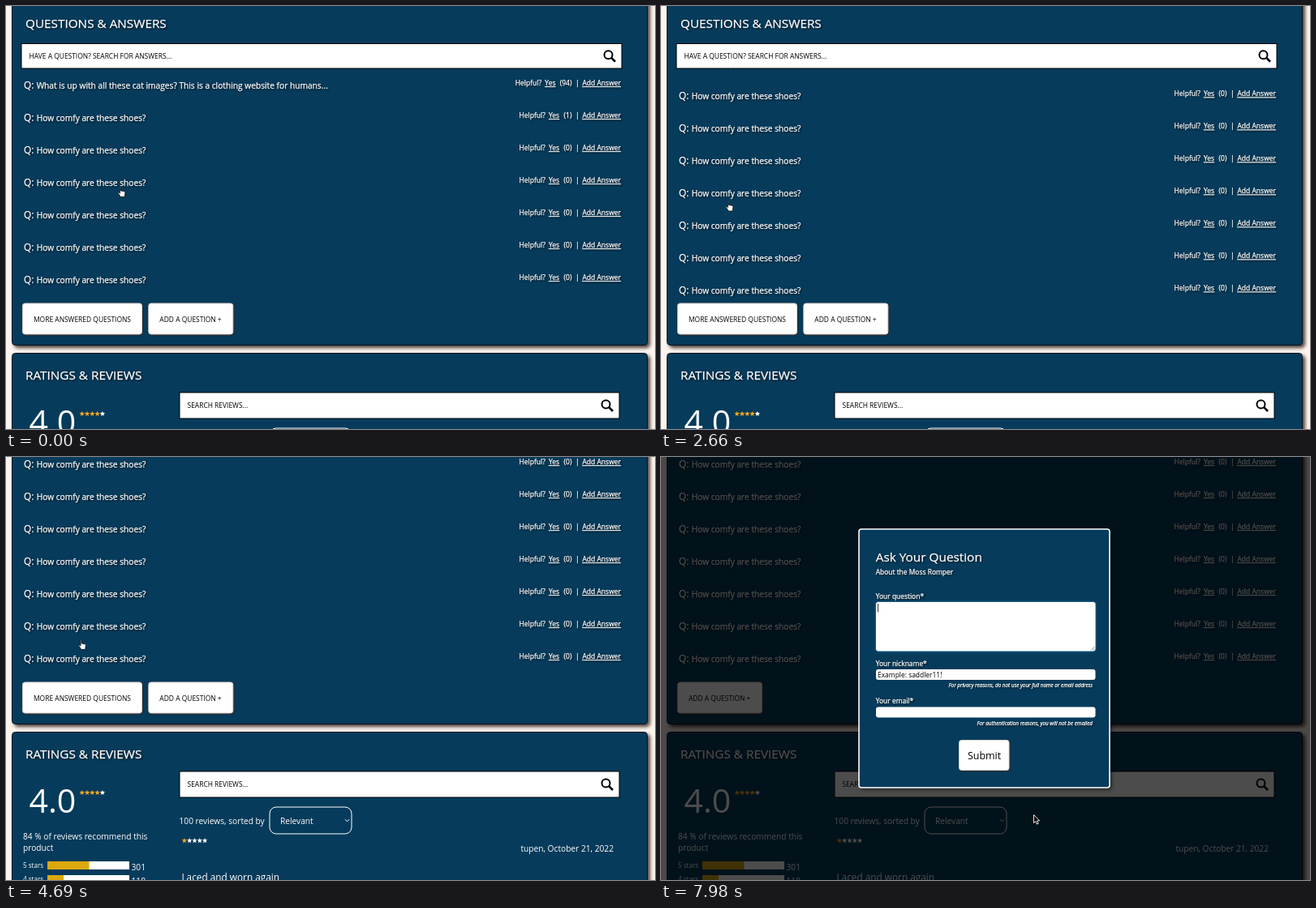
Write an HTML page that moves like this. It is 800 px wide and 522 px high and loops after 8 s.

```html
<!DOCTYPE html>
<html lang="en">
<head>
<meta charset="utf-8">
<title>Questions and answers</title>
<style>
  html, body { margin: 0; width: 100%; height: 100%; overflow: hidden; background: #fcf4ee; }
  svg { display: block; width: 800px; height: 522px; font-family: "Open Sans", "Noto Sans", sans-serif; }
  text { fill: #fff; white-space: pre; }
  .ink { fill: #000; }
  .lit { filter: drop-shadow(1px 1px 1px rgba(0, 0, 0, .75)); }
  .lit text { stroke: #fff; stroke-width: .25; }
  .panel { fill: #063b5b; stroke: #04121c; filter: drop-shadow(3px 3px 2px rgba(50, 32, 26, .85)); }
  .btn rect { fill: #fff; stroke: #d9d2cc; filter: drop-shadow(1px 1px 1px rgba(60, 40, 30, .8)); }
  .btn text { fill: #000; }
  .btn.on rect { fill: #1d272e; stroke: #78838a; filter: none; }
  .btn.on text { fill: #fff; }
  .field { fill: #fff; stroke: #000; }
  .hint { font-style: italic; text-anchor: end; }
  .focus { filter: drop-shadow(0 0 1px #4aa3e0); }
</style>
</head>
<body>
<svg id="stage" viewBox="0 0 800 522"></svg>
<script>
const LOOP = 8000, MORE_GONE = 5800, MODAL_AT = 6570, FOCUS_AT = 7430;

// [time, value...]
const listTrack = [[2240, 0], [2310, 1.3], [2450, 22], [2650, 66], [2850, 80], [4700, 80], [4900, 112], [5150, 152], [5350, 160]];
const pageTrack = [[2790, 0], [2940, 14.5], [3150, 68], [3250, 83], [3360, 89]];
const mouseTrack = [
  [0, 140.5, 224], [120, 140.5, 224], [600, 96, 386], [1720, 96, 388], [2150, 82.5, 241.5],
  [3290, 82.5, 241.5], [3430, 82.5, 288], [3600, 89.5, 294.5], [4200, 89.5, 294.5], [4520, 92, 226],
  [5250, 92, 226], [5470, 89.5, 294.5], [6620, 89.5, 294.5], [7200, 342, 204], [7480, 344, 206], [7930, 459.5, 441.5]
];

const smooth = u => u * u * (3 - 2 * u);
function at(track, t, ease = u => u) {
  const next = track.findIndex(k => k[0] > t);
  if (next < 0) return track[track.length - 1].slice(1);
  if (next === 0) return track[0].slice(1);
  const a = track[next - 1], b = track[next];
  const u = ease((t - a[0]) / (b[0] - a[0]));
  return a.slice(1).map((v, i) => v + (b[i + 1] - v) * u);
}

const text = (x, y, size, str, attrs = "") =>
  `<text x="${x}" y="${y}" font-size="${size}" ${attrs}>${str}</text>`;
const rect = (x, y, w, h, attrs = "") =>
  `<rect x="${x}" y="${y}" width="${w}" height="${h}" ${attrs}/>`;

function stars(x, y, gold) {
  let out = "";
  for (let i = 0; i < 5; i++) {
    const pts = Array.from({ length: 10 }, (_, k) => {
      const r = k % 2 ? 1.5 : 3.4, a = Math.PI * (k / 5 - .5);
      return (x + 3.2 + i * 6.3 + r * Math.cos(a)).toFixed(2) + "," + (y + r * Math.sin(a)).toFixed(2);
    });
    out += `<polygon points="${pts.join(" ")}" fill="${i < gold ? "#f3a61c" : "#fff"}"/>`;
  }
  return out;
}

const search = (x, y, w, h, label) =>
  rect(x, y, w, h, 'class="field"') +
  text(x + 9.5, y + h / 2 + 3.1, 8.45, label, 'class="ink"') +
  `<g transform="translate(${x + w - 15} ${y + h / 2})" fill="none" stroke="#000" stroke-width="2">
    <circle cx="-1.5" cy="-1.5" r="5"/><path d="M2.2 2.2L7 7" stroke-width="2.6"/></g>`;

function row(i) {
  const votes = [94, 1][i] ?? 0, dx = votes > 9 ? -4.7 : 0, y = 40 * i;
  const q = i ? "How comfy are these shoes?"
    : "What is up with all these cat images? This is a clothing website for humans...";
  const b = y + 98.2, link = 'text-decoration="underline"';
  return text(22, y + 102.2, 11.8, "Q:") + text(37.7, y + 101.6, 10.2, q) +
    text(632.5 + dx, b, 8.5, "Helpful?") + text(669 + dx, b, 8.5, "Yes", link) +
    text(697.5, b, 8.5, `(${votes})`, 'text-anchor="end"') + text(702, b, 8.5, "|") +
    text(758, b, 8.5, "Add Answer", link + ' text-anchor="end"');
}

const button = (id, w, label) =>
  `<g id="${id}" class="btn">${rect(.5, .5, w, 38, 'rx="3"')}${text(14, 23, 8.45, label)}</g>`;

function bar(y, label, fill, count) {
  return text(21, y + 8, 8.1, label) + rect(51, y, 101, 10, 'fill="#fff"') +
    rect(51, y, fill, 10, 'fill="#dba90f"') + text(154.5, y + 10.5, 10.2, count);
}

const page = `
  ${rect(7.5, -60, 783, 478.5, 'rx="4" class="panel"')}
  ${rect(7.5, 428.5, 783, 300, 'rx="4" class="panel"')}
  <g class="lit">${text(24, 27.4, 15.3, "QUESTIONS &amp; ANSWERS")}${text(24, 461.4, 15.3, "RATINGS &amp; REVIEWS")}</g>
  ${search(19, 46.5, 740, 30.5, "HAVE A QUESTION? SEARCH FOR ANSWERS...")}
  <g clip-path="url(#listBox)"><g id="list" class="lit">${Array.from({ length: 11 }, (_, i) => row(i)).join("")}</g></g>
  ${button("more", 147, "MORE ANSWERED QUESTIONS")}
  ${button("add", 104, "ADD A QUESTION +")}
  ${search(214, 477, 542, 32, "SEARCH REVIEWS...")}
  ${text(28.5, 528, 41, "4.0")}
  ${stars(90.5, 503.3, 4)}
  ${text(21, 560.8, 10.2, "84 % of reviews recommend this")}
  ${text(21, 574.8, 10.2, "product")}
  ${bar(588, "5 stars", 51.5, 301)}
  ${bar(605, "4 stars", 20, 118)}
  ${text(213.5, 541.6, 10.2, "100 reviews, sorted by")}
  ${rect(325, 521, 101, 33, 'rx="8" fill="none" stroke="#fff"')}
  ${text(338, 541.6, 10.2, "Relevant")}
  <path d="M418 536.2l2.6 2.6 2.6-2.6" fill="none" stroke="#fff"/>
  ${stars(216.7, 562.4, 1)}
  ${text(749, 575.6, 10.2, "tupen, October 21, 2022", 'text-anchor="end"')}
  ${text(216.5, 612.4, 11.8, "Laced and worn again")}`;

const modal = `
  ${rect(0, 0, 800, 522, 'fill="#000" opacity=".7"')}
  ${rect(244, 89, 309, 319, 'rx="3" fill="#063b5b" stroke="#fff" stroke-width="1.6" style="filter:drop-shadow(2px 2px 2px rgba(0,0,0,.5))"')}
  <g class="lit">
    ${text(264.7, 128.8, 15.35, "Ask Your Question")}
    ${text(264.7, 145.3, 8.45, "About the Moss Romper")}
    ${text(264.7, 175.3, 8.45, "Your question*")}
    ${text(264.7, 257.8, 8.45, "Your nickname*")}
    ${text(264.7, 304.3, 8.45, "Your email*")}
    ${text(532, 284.1, 6.35, "For privacy reasons, do not use your full name or email address", 'class="hint"')}
    ${text(532, 330.6, 6.35, "For authentication reasons, you will not be emailed", 'class="hint"')}
  </g>
  ${rect(265, 179, 270.5, 60.5, 'id="area" rx="3" fill="#fff"')}
  <path d="M530 238.5l4.5-4.5M532.5 238.5l2-2" stroke="#666" stroke-width=".7"/>
  <path id="caret" d="M267.5 181v10.5" stroke="#000" stroke-width=".8"/>
  ${rect(265, 262, 270.5, 13, 'rx="3" fill="#fff"')}
  ${text(267, 271.6, 8.45, "Example: saddler11!", 'class="ink"')}
  ${rect(265, 308.5, 270.5, 13, 'rx="3" fill="#fff"')}
  <g class="btn">${rect(367.5, 349.5, 61.5, 37, 'rx="3"')}${text(378, 372.7, 12.4, "Submit")}</g>`;

const shapes = {
  arrow: '<path d="M0 0V10L2.3 8 3.9 11.6 5.6 10.9 4 7.4H7.1Z" fill="#000" stroke="#fff" stroke-width=".9"/>',
  hand: '<path transform="translate(-2.5 -.5)" d="M2.5.5c.8 0 1 .5 1 1v3l4 .8c1 .2 1.5.8 1.4 1.8l-.6 3.4V12h-5L.5 7.8c-.6-.9.5-1.6 1.2-.9l.8.8V1.5c-.9 0-.8-1 0-1z" fill="#fff" stroke="#111" stroke-width=".8"/>',
  beam: '<path d="M-2-5q2 0 2 1V4q0 1-2 1M2-5q-2 0-2 1M2 5q-2 0-2-1" fill="none" stroke="#000"/>'
};

const stage = document.getElementById("stage");
stage.innerHTML = `<defs><clipPath id="listBox">${rect(8, 78, 782, 284)}</clipPath></defs>
  ${rect(0, 0, 800, 522, 'fill="#fcf4ee"')}
  <g id="page">${page}</g><g id="modal">${modal}</g>
  <g id="mouse">${Object.entries(shapes).map(([k, s]) => `<g id="${k}">${s}</g>`).join("")}</g>`;

const el = id => document.getElementById(id);
const move = (id, x, y) => el(id).setAttribute("transform", `translate(${x} ${y})`);
const show = (id, on) => el(id).setAttribute("visibility", on ? "visible" : "hidden");

// Hover styling trails the pointer slightly.
function hovered(t) {
  if (t >= MODAL_AT) return false;
  const past = t - 80;
  const [x, y] = at(mouseTrack, past, smooth), py = y + at(pageTrack, past)[0];
  return x > 20 && x < 168 && py > 366 && py < 406;
}

function render(t) {
  const scroll = at(pageTrack, t)[0], open = t >= MODAL_AT, gone = t >= MORE_GONE;
  const [x, y] = at(mouseTrack, t, smooth), hot = hovered(t), focus = t >= FOCUS_AT;
  move("page", 0, -scroll);
  move("list", 0, -at(listTrack, t)[0]);

  show("more", !gone);
  move("more", hot ? 19.5 : 20, 366.5);
  move("add", gone ? 20 : hot ? 174 : 175.3, 366.5);
  el("more").classList.toggle("on", hot);
  el("add").classList.toggle("on", hot && gone);

  el("modal").style.display = open ? "" : "none";
  el("area").classList.toggle("focus", focus);
  show("caret", open && focus);

  const overList = !open && y + scroll > 78 && y + scroll < 360;
  const overArea = open && x > 265 && x < 535 && y > 179 && y < 239;
  const kind = overList ? "hand" : overArea ? "beam" : "arrow";
  for (const k in shapes) show(k, k === kind);
  move("mouse", x, y);
}

const start = performance.now();
function tick() {
  render((performance.now() - start) % LOOP);
  requestAnimationFrame(tick);
}
tick();
</script>
</body>
</html>
```
